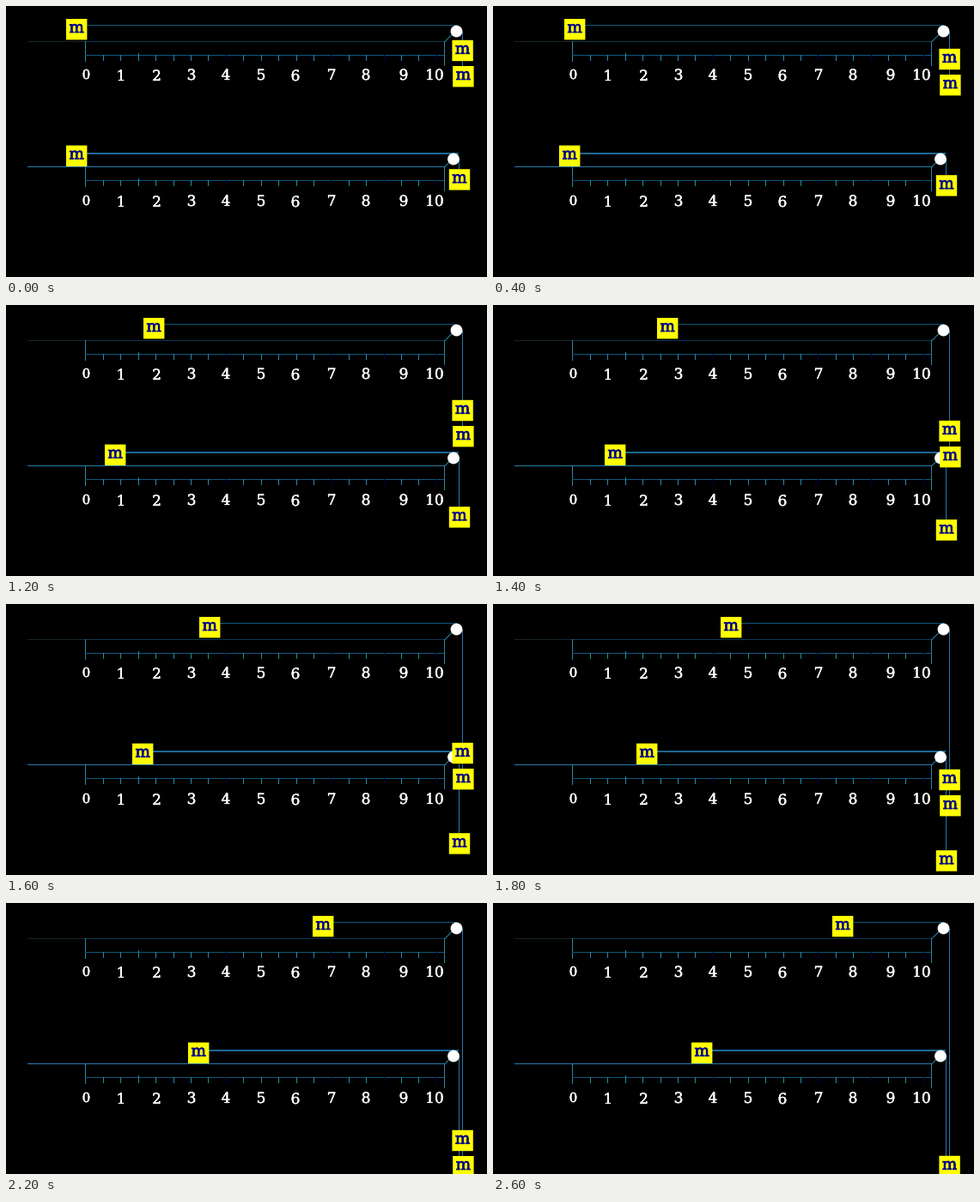
Recreate the animation shown at these times as a matplotlib script. Size 560 px wide and 316 px high, loop 2800 ms.

```python
import matplotlib.pyplot as plt
from matplotlib.animation import FuncAnimation
from matplotlib.patches import Circle, Rectangle
from matplotlib.patheffects import withStroke

W, H, DPI = 560, 316, 100
PX = 72 / DPI  # points per pixel
FRAMES, INTERVAL = 14, 200
SIDE = 24.4
LAST_STEP = 11.73  # the blocks come to rest here

BLUE, TEAL, DIM, NAVY = "#2878a8", "#2889ab", "#0d3850", "#00004c"
DARK_TEAL = "#0e5878"
YELLOW, INK = "#ffff00", "#00008c"

plt.rcParams["font.family"] = "DejaVu Serif"
fig = plt.figure(figsize=(W / DPI, H / DPI), dpi=DPI, facecolor="black")
ax = fig.add_axes([0, 0, 1, 1])
ax.set_xlim(0, W)
ax.set_ylim(H, 0)
ax.axis("off")


def bar(x, y, w, h, color, z=1):
    """Crisp line made of whole pixels."""
    return ax.add_patch(Rectangle((x, y), w, h, fc=color, lw=0,
                                  antialiased=False, zorder=z))


def label(x, y, text, px, color, z=1, stroke=0.4):
    """Regular serif text, thickened a little to a semi-bold weight."""
    return ax.text(x, y, text, size=px * PX, color=color, zorder=z,
                   ha="center", va="baseline",
                   path_effects=[withStroke(linewidth=stroke * PX,
                                            foreground=color)])


class Block:
    """Yellow square marked with its mass."""

    def __init__(self, x, y, z):
        self.box = ax.add_patch(Rectangle((x, y), SIDE, SIDE, fc=YELLOW, lw=0,
                                          snap=False, zorder=z))
        self.mark = label(x, y, "m", 18.5, INK, z + 0.5, stroke=0.7)
        self.place(x, y)

    def place(self, x, y):
        self.box.set_xy((x, y))
        self.mark.set_position((x + SIDE / 2, y + 16))


def draw_ruler(top, label_shift, line_color):
    bar(92, top, 1, 24, TEAL)
    bar(92, top + 16, 418, 1, line_color)
    for k in range(1, 21):
        x = round(92.5 + 20.42 * k)
        rise = 2 if k == 3 else 0
        color = NAVY if k in (8, 14, 17, 20) else TEAL
        bar(x, top + 16 - rise, 1, 7 + rise, color)
    bar(510, top, 1, 29, TEAL)

    xs = (93.5, 134, 175.5, 216, 256, 297, 337, 379, 419, 463, 499)
    dips = (-1, 1, 1, 0, 0, 0, 1, 0, 0, 0, 0)
    for n, (x, dip) in enumerate(zip(xs, dips)):
        label(x, 86 + label_shift + dip, str(n), 15 if n == 0 else 17, "white")


def draw_pulley(x, y, table):
    ax.plot([511, 519], [table + 0.5, table - 7.5], color=TEAL, lw=PX, zorder=1)
    ax.add_patch(Circle((x, y), 6.9, fc="white", lw=0, zorder=3))


bar(25, 41, 68, 1, "#16242a")
bar(93, 41, 418, 1, DIM)
draw_ruler(41, 0, DARK_TEAL)
draw_pulley(524.5, 29.5, 41)

bar(25, 187, 486, 1, BLUE)
draw_ruler(187, 147, DARK_TEAL)
draw_pulley(521, 178.5, 187)

upper_cord = bar(93, 22, 432, 1, DARK_TEAL, 2)
upper_drop = bar(531, 30, 1, 40, BLUE, 2)
lower_cord = bar(93, 171, 434, 2, "#1c6896", 2)
lower_drop = bar(527, 178, 1, 12, BLUE, 2)

lower_block = Block(70, 162.6, 4)
lower_weight = Block(515.8, 190.2, 4)
upper_block = Block(70, 15, 5)
upper_weights = [Block(519.4, 39.8, 6), Block(520.2, 70, 7)]


def stretch(cord, left, right):
    cord.set_x(left)
    cord.set_width(right - left)


def update(i):
    n = min(i, LAST_STEP)
    upper = 0.45 + 1.58 * n + 2.225 * n * n
    lower = round(0.45 + 0.9 * n + 1.087 * n * n)
    fall = round(0.785 * upper)
    upper = round(upper)

    upper_block.place(70 + upper, 15)
    upper_weights[0].place(519.4, 39.8 + fall)
    upper_weights[1].place(520.2, 70 + fall)
    stretch(upper_cord, 94 + upper, 525)
    upper_drop.set_height(40 + fall)

    lower_block.place(70 + lower, 162.6)
    lower_weight.place(515.8, 190.2 + lower)
    stretch(lower_cord, 94 + lower, 527)
    lower_drop.set_height(12 + lower)
    return []


anim = FuncAnimation(fig, update, frames=FRAMES, interval=INTERVAL,
                     init_func=lambda: update(0), repeat=True, repeat_delay=0)
plt.show()
```
